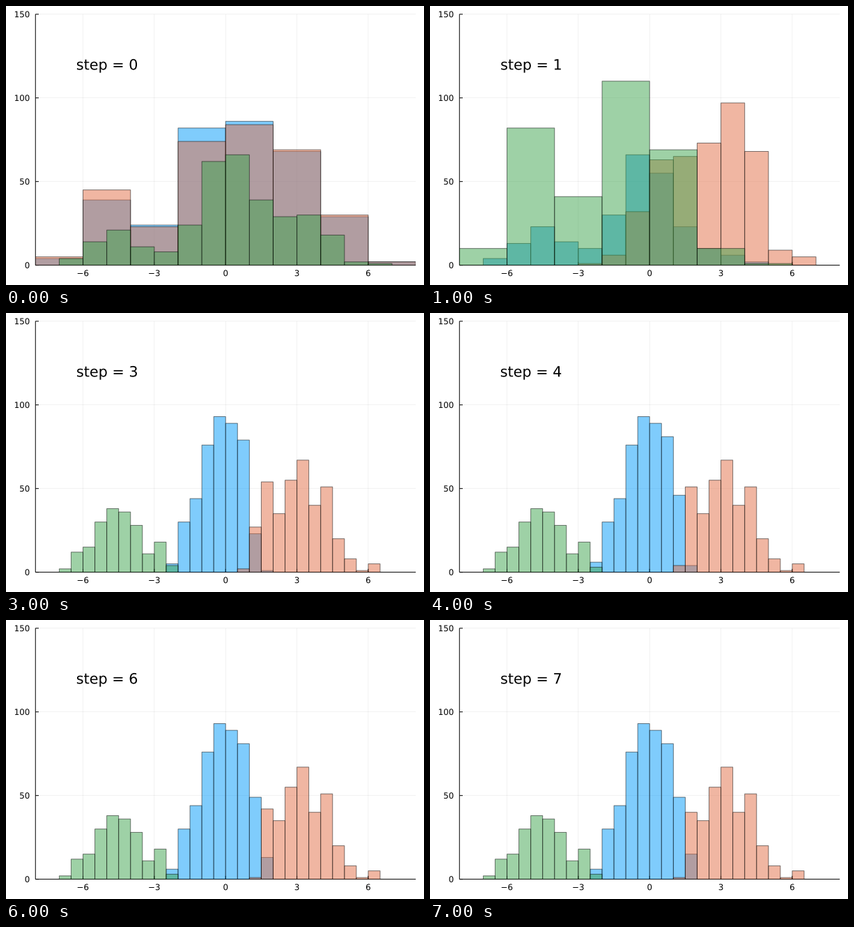
These frames come from a looping animation (600x400 px, 8000 ms). A matplotlib script:

```python
import numpy as np
import matplotlib.pyplot as plt
from matplotlib.animation import FuncAnimation
from matplotlib.patches import PathPatch
from matplotlib.textpath import TextPath
from matplotlib.transforms import Affine2D

W, H, DPI = 600, 400, 100
PX = 72 / DPI  # points per pixel
LEFT, RIGHT, TOP, BOTTOM = 42.28, 588.19, 11.81, 371.61
COLORS = "#009AFA", "#E36F47", "#3EA44E"
STEPS = 8
TICK_FONT, TITLE_FONT = 11.85, 20.74

# The sample, binned by 0.5 from -7 upwards and padded to the range -8..8
SAMPLE = np.pad([2, 12, 15, 30, 38, 36, 28, 11, 18, 9, 30, 44, 76, 93, 89, 81,
                 50, 55, 35, 55, 67, 40, 51, 20, 8, 1, 5], (2, 3))
CENTERS = np.arange(-8, 8, 0.5) + 0.25


def logits(step):
    """Log weights of the left (green) and right (orange) clusters against blue."""
    x = CENTERS
    if step == 0:  # nearly even random split
        blue = 0.02 + 0.09 * np.cos(0.9 * (x + 2.5))
        orange = 0.02 - 0.13 * np.cos(0.6 * x)
        return -2 * blue - orange, orange - blue
    if step == 1:
        return -0.17 * x, 0.9 * (x - 0.35)
    if step == 2:
        return -4 * (x + 1.4), 15 * (x - 0.747)
    # The borders settle exponentially
    rest = 0.406 ** (step - 3)
    slope = 11.2 - 3.5 * rest
    return (-slope * (x + 2.31 - 0.025 * rest),
            slope * (x - 1.672 + 0.44 * rest))


def clusters(step):
    """Counts per fine bin for blue, orange and green."""
    green, orange = logits(step)
    weights = np.exp([0 * CENTERS, orange, green])
    return SAMPLE * weights / weights.sum(axis=0)


def bin_widths(step):
    return {0: (2, 2, 1), 1: (1, 1, 2), 2: (0.5, 0.5, 1)}.get(step, (0.5,) * 3)


fig = plt.figure(figsize=(W / DPI, H / DPI), dpi=DPI, facecolor="white")
plt.rcParams["font.family"] = "DejaVu Sans"
ax = fig.add_axes([LEFT / W, 1 - BOTTOM / H, (RIGHT - LEFT) / W, (BOTTOM - TOP) / H])
ax.set(xlim=(-8, 8), ylim=(0, 150))
ax.axis("off")


def rule(xs, ys, width=1, alpha=1):
    ax.plot(xs, ys, color="black", lw=width * PX, alpha=alpha, zorder=1,
            snap=False, clip_on=False, solid_capstyle="butt")


def text_path(text, x, y, size, align=0.5):
    """Outline of text on baseline y, its ink aligned at x, in stage pixels."""
    path = TextPath((0, 0), text, size=size)
    box = path.get_extents()
    shift = x - box.x0 - align * box.width
    return Affine2D().translate(shift, H - y).transform_path(path)


def label(*args):
    patch = PathPatch(text_path(*args), facecolor="black", lw=0,
                      transform=Affine2D().scale(1 / W, 1 / H) + fig.transFigure)
    return fig.add_artist(patch)


def stage_x(v):
    return LEFT + (v + 8) / 16 * (RIGHT - LEFT)


def stage_y(v):
    return BOTTOM - v / 150 * (BOTTOM - TOP)


for v in range(-6, 7, 3):
    rule([v, v], [0, 150], 0.5, 0.1)
    rule([v, v], [0, 1.97])
    label(str(v).replace("-", "\u2212"), stage_x(v), 387.2, TICK_FONT)
for v in range(0, 151, 50):
    rule([-8, 8], [v, v], 0.5, 0.1)
    rule([-8, -7.862], [v, v])
    label(str(v), 33.5, stage_y(v) + 4.32, TICK_FONT, 1)
rule([-8, 8], [0, 0])
rule([-8, -8], [0, 150])


def title_path(step):
    return text_path(f"step = {step}", 145, stage_y(120) + 7.56, TITLE_FONT)


title = label("step = 0", 145, stage_y(120) + 7.56, TITLE_FONT)
bars = []


def draw(step):
    while bars:
        bars.pop().remove()
    for color, fine, width in zip(COLORS, clusters(step), bin_widths(step)):
        counts = np.rint(fine.reshape(-1, int(2 * width)).sum(axis=1))
        edges = np.arange(-8, 8, width)
        seen = counts > 0
        bars.extend(ax.bar(edges[seen], counts[seen], width, align="edge",
                           color=color, edgecolor="black", alpha=0.5,
                           lw=PX, zorder=3, snap=False))
    title.set_path(title_path(step))
    return [*bars, title]


anim = FuncAnimation(fig, draw, frames=STEPS, interval=1000,
                     repeat=True, repeat_delay=0, blit=False)
plt.show()
```
